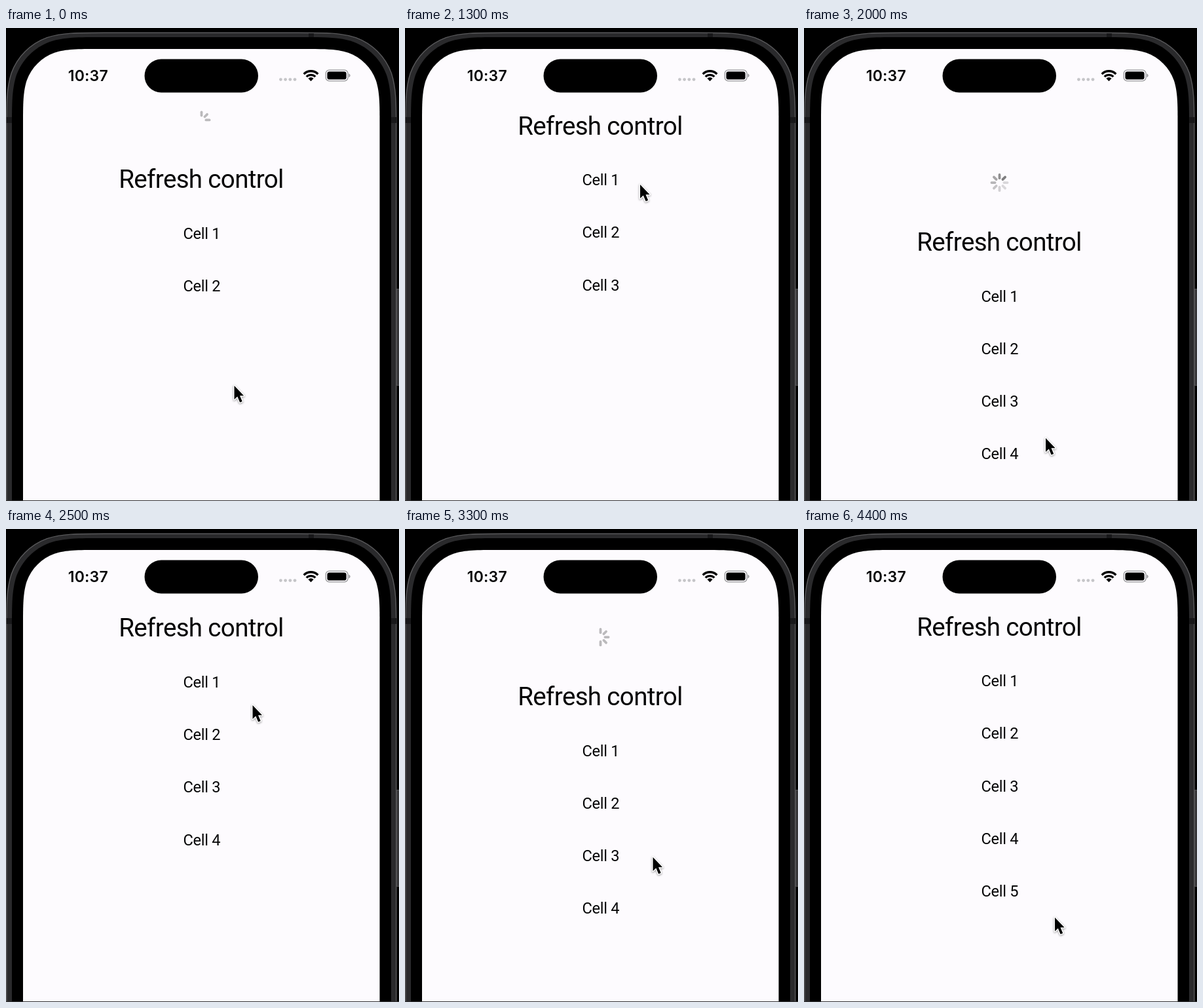
An HTML page that plays this animation: 600x722 px, repeating every 4800 ms.

```html
<!DOCTYPE html>
<html lang="en">
<head>
<meta charset="utf-8">
<title>Refresh control</title>
<style>
  html, body { margin: 0; width: 100%; height: 100%; overflow: hidden; background: #000; }
  svg { display: block; width: 600px; height: 722px; }
  text { text-anchor: middle; fill: #050506; font-family: Roboto, "Liberation Sans", sans-serif; }
  .clock { font: 600 23px Inter, "Liberation Sans", sans-serif; letter-spacing: .2px; }
  .title { font-size: 38.5px; letter-spacing: -.65px; }
  .cell { font-size: 23.6px; letter-spacing: -.3px; }
  #cursor { filter: drop-shadow(0 1.5px 1.5px rgba(0, 0, 0, .4)); }
</style>
</head>
<body>
<svg viewBox="0 0 600 722">
  <rect width="600" height="722"/>

  <!-- phone body -->
  <rect x="596.5" y="398.5" width="6" height="147" fill="#363638" stroke="#505052"/>
  <path id="body" fill="#2a2a2c" stroke="#59595b" stroke-width="1.4"/>
  <g fill="#18181a">
    <rect x="1" y="136" width="9" height="9"/>
    <rect x="587" y="136" width="9" height="9"/>
    <rect x="462" y="8" width="8" height="7"/>
  </g>
  <path id="bezel"/>
  <path id="screen" fill="#fdfbfe"/>

  <g id="list">
    <g id="spinner"></g>
    <text class="title" x="298" y="162.5">Refresh control</text>
  </g>

  <!-- status bar -->
  <rect x="211.5" y="47.5" width="173.5" height="51" rx="25.5"/>
  <text class="clock" x="125.3" y="81">10:37</text>
  <g fill="#c5c5c8">
    <circle cx="419.4" cy="78.6" r="2.4"/>
    <circle cx="426.6" cy="78.6" r="2.4"/>
    <circle cx="433.8" cy="78.6" r="2.4"/>
    <circle cx="441" cy="78.6" r="2.4"/>
  </g>
  <g fill="none" stroke="#000" stroke-width="3.3">
    <path d="M454.7 70.3A15.1 15.1 0 0 1 476.3 70.3"/>
    <path d="M458.7 74.4A9.5 9.5 0 0 1 472.3 74.4"/>
  </g>
  <path d="M465.5 81.2L461.4 77A5.8 5.8 0 0 1 469.6 77Z"/>
  <rect x="488.2" y="64.2" width="33.8" height="16.6" rx="5.2" fill="none" stroke="#98989b" stroke-width="1.3"/>
  <rect x="490.4" y="66.4" width="29.2" height="12.2" rx="3.4"/>
  <path d="M523.4 69.6Q525.6 70.6 525.6 72.6T523.4 75.6Z" fill="#98989b"/>

  <path id="cursor" d="M0 0V21L4.8 16.5L8.6 25.4L12.2 23.9L8.5 15.2H14.6Z"
        stroke="#fff" stroke-width="3" stroke-linejoin="round" paint-order="stroke"/>
  <rect y="721" width="600" height="1" fill="#333335"/>
</svg>

<script>
const LOOP = 4800, TICK = 100;
const VIEW = 1182;          // scroll view height used by the rubber band
const ROW = 80.3;
const FADE = [.5, .43, .34, .28, .22, .17, .14, .14];

// grab: cursor height where the pull begins; rest: scroll one tick after letting go
const PULLS = [
  { from: 0,    load: 200,  drop: 400,  grab: 386, rest: 111.5 },
  { from: 1300, load: 1700, drop: 2000, grab: 246, rest: 105 },
  { from: 2900, load: 3500, drop: 3800, grab: 288, rest: 94.5 }
];

// cursor height at each tick, then it stays still
const CURSOR_Y = [
  546, 606, 679, 735, 755, 755, 740, 395, 275, 244, 236, 235, 235,
  239, 287, 375, 475, 544, 585, 612, 626, 600, 500, 380, 300, 269, 268, 271, 271,
  279, 310, 340, 398, 501, 556, 586, 603, 607.5, 606, 597, 593
];
const CURSOR_X = [
  [0, 348.5], [500, 352], [1100, 358.5], [1200, 358.5], [1300, 359], [2000, 369],
  [2500, 376.5], [2700, 377], [2800, 377], [3300, 378.5], [4000, 383], [LOOP, 383]
];

const $ = id => document.getElementById(id);

function add(parent, tag, attrs) {
  const el = document.createElementNS("http://www.w3.org/2000/svg", tag);
  for (const key in attrs) el.setAttribute(key, attrs[key]);
  return parent.appendChild(el);
}

function move(el, x, y) {
  el.setAttribute("transform", `translate(${x} ${y})`);
}

// panel with smooth top corners that runs off the bottom of the stage
function panel(id, left, right, top, r) {
  const half = [
    [0, 1.529], [0, 1.088], [0, .868], [.075, .631], [.169, .372],
    [.372, .169], [.631, .075], [.868, 0], [1.088, 0], [1.529, 0]
  ];
  const west = half.map(([u, v]) => `${left + u * r} ${top + v * r}`);
  const east = half.map(([u, v]) => `${right - u * r} ${top + v * r}`).reverse();
  $(id).setAttribute("d", `M${left} 800L${west[0]}C${west.slice(1).join(" ")}` +
    `L${east[0]}C${east.slice(1).join(" ")}L${right} 800Z`);
}
panel("body", .8, 595.8, 7.2, 98);
panel("bezel", 9, 588, 14, 92);
panel("screen", 26, 570.5, 32, 76);

const petals = FADE.map((_, i) => add($("spinner"), "rect", {
  x: -1.9, y: -14, width: 3.8, height: 9, rx: 1.9, transform: `rotate(${i * 45})`
}));
move($("spinner"), 298.5, 58.5);

const cells = [1, 2, 3, 4, 5].map(n => {
  const el = add($("list"), "text", { class: "cell", x: 298.8, y: 240 + (n - 1) * ROW });
  el.textContent = "Cell " + n;
  return el;
});

function lerp(table, t) {
  const i = table.findIndex(([at]) => at > t);
  const [t0, a] = table[i - 1], [t1, b] = table[i];
  return a + (b - a) * (t - t0) / (t1 - t0);
}

function rubber(distance) {
  const d = Math.max(0, distance) * .55;
  return VIEW * d / (VIEW + d);
}

function scrollAt(pull, t, y) {
  if (t <= pull.drop) return rubber(y - pull.grab);
  const left = pull.rest * .36 ** ((t - pull.drop) / TICK - 1);
  return left < .6 ? 0 : left;
}

function petalAlpha(i, pull, t, scroll) {
  if (t > pull.drop + TICK) return 0;
  if (t < pull.load) return i < Math.floor((scroll - 45) / 12) ? .26 : 0;
  const head = (t - pull.load) / TICK - 2;
  return FADE[(head - i + 16) % 8];
}

function draw(time) {
  const t = Math.floor(time % LOOP / TICK) * TICK;
  const y = CURSOR_Y[Math.min(t / TICK, CURSOR_Y.length - 1)];
  const pull = PULLS.filter(p => t >= p.from).pop();
  const scroll = scrollAt(pull, t, y);
  const count = 2 + PULLS.filter(p => t >= p.load).length;

  move($("list"), 0, scroll);
  move($("cursor"), lerp(CURSOR_X, t), y);
  petals.forEach((el, i) => el.setAttribute("opacity", petalAlpha(i, pull, t, scroll)));
  cells.forEach((el, i) => el.setAttribute("visibility", i < count ? "visible" : "hidden"));
}

const start = performance.now();
function loop() {
  draw(performance.now() - start);
  requestAnimationFrame(loop);
}
loop();
</script>
</body>
</html>
```
